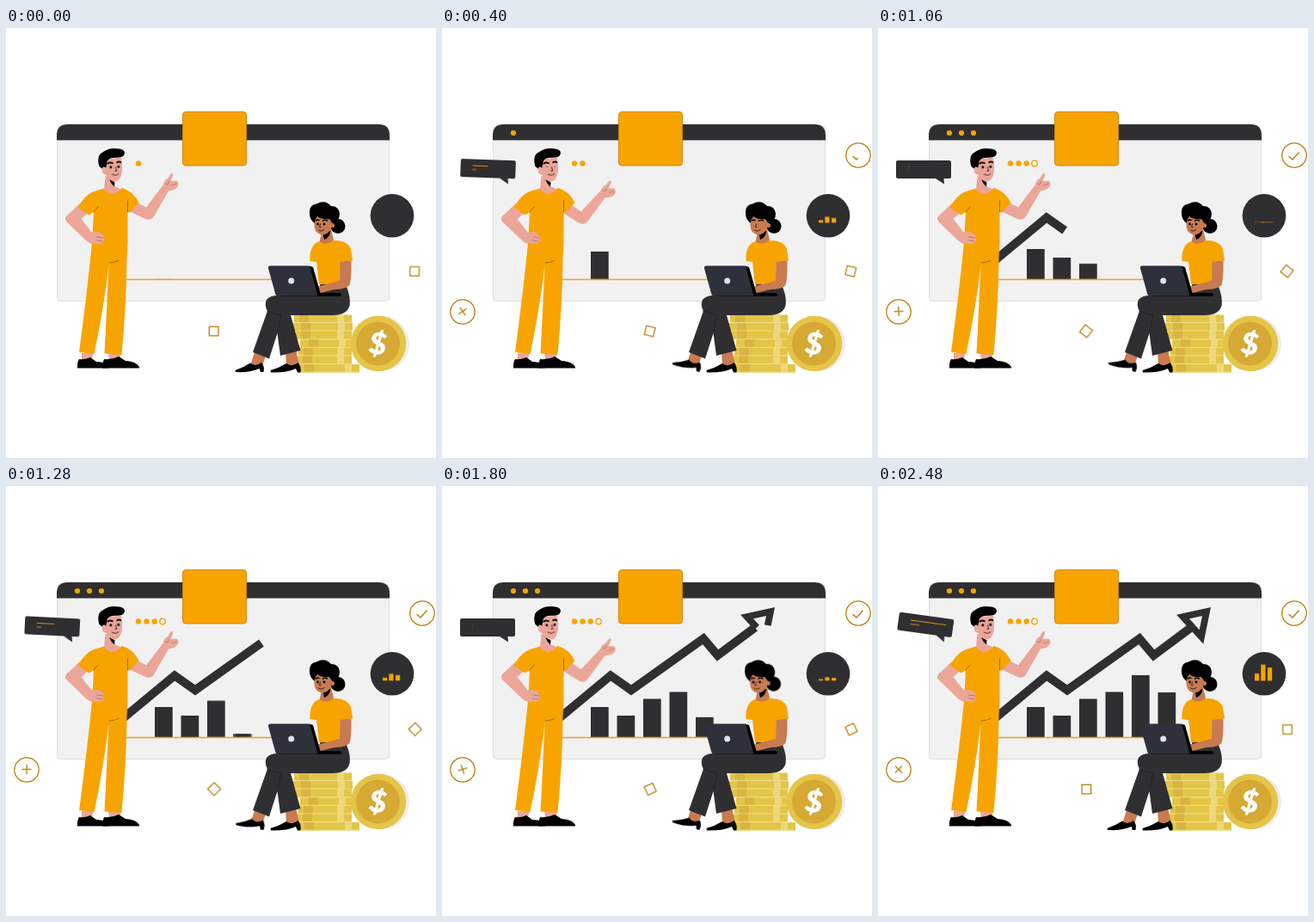
Recreate the animation shown at these times as an HTML page. Size 500x500 px, loop 2.5 s.

```html
<!DOCTYPE html>
<html lang="en">
<head>
<meta charset="utf-8">
<title>Growth presentation</title>
<style>
html, body { margin: 0; width: 100%; height: 100%; overflow: hidden; background: #fff; }
svg { display: block; width: 100vw; height: 100vh; }

.ink { fill: #2f2f31; }
.gold { fill: #f7a400; }
.skin { fill: #eba699; }
.tan { fill: #c87a50; }
.thin { fill: none; stroke: #b97a04; stroke-width: 1.25; }
.crease { fill: none; stroke: #8a5a00; stroke-width: .8; stroke-linecap: round; }
.fold { fill: none; stroke: #b0705f; stroke-width: .8; stroke-linecap: round; }
.face { fill: none; stroke: #111; stroke-linecap: round; }

/* every part runs on the 2.5 s loop or a whole fraction of it */
.loop { animation: 2.5s linear infinite both; }
.half { animation: 1.25s linear infinite both; }
.third { animation: .83333s linear infinite both; }

.spin { animation-name: spin; }
@keyframes spin { to { transform: rotate(90deg); } }
.sway { animation: sway 1.25s cubic-bezier(.37, 0, .63, 1) infinite alternate both; }
@keyframes sway { to { transform: rotate(45deg); } }

.bar { transform-origin: 0 292px; }
.b1 { animation-name: b1; } .b2 { animation-name: b2; } .b3 { animation-name: b3; }
.b4 { animation-name: b4; } .b5 { animation-name: b5; } .b6 { animation-name: b6; }
@keyframes b1 { 0% { transform: scaleY(0); } 17.5%, to { transform: none; } }
@keyframes b2 { 0%, 16.7% { transform: scaleY(0); } 33.3%, to { transform: none; } }
@keyframes b3 { 0%, 36% { transform: scaleY(0); } 52%, to { transform: none; } }
@keyframes b4 { 0%, 50% { transform: scaleY(0); } 66.7%, to { transform: none; } }
@keyframes b5 { 0%, 66.7% { transform: scaleY(0); } 83.3%, to { transform: none; } }
@keyframes b6 { 0%, 83.3% { transform: scaleY(0); } 98.5%, to { transform: none; } }

.trend { stroke-dasharray: 294 400; animation-name: trend; }
@keyframes trend {
  0%, 22% { stroke-dashoffset: 294.5; }
  29.6% { stroke-dashoffset: 262; }
  42.4% { stroke-dashoffset: 186; }
  59.2%, to { stroke-dashoffset: 0; }
}
.tip { stroke-dasharray: 100 200; animation-name: tip; }
@keyframes tip {
  0%, 60% { stroke-dashoffset: 100.5; }
  72% { stroke-dashoffset: 32; }
  80%, to { stroke-dashoffset: 0; }
}

.p1 { animation-name: p1; } .p2 { animation-name: p2; } .p3 { animation-name: p3; }
.pop { transform-box: fill-box; transform-origin: center; }
@keyframes p1 { 0%, 8% { transform: scale(0); } 13%, to { transform: none; } }
@keyframes p2 { 0%, 23% { transform: scale(0); } 27%, to { transform: none; } }
@keyframes p3 { 0%, 36% { transform: scale(0); } 40%, to { transform: none; } }

.show { animation-name: show; }
@keyframes show { 0%, 8.9% { visibility: hidden; } 9%, to { visibility: visible; } }

.check { stroke-dasharray: 18 40; animation-name: check; }
@keyframes check { 0%, 10% { stroke-dashoffset: 18.5; } 22%, to { stroke-dashoffset: 0; } }

.tilt { transform-origin: 77px 180px; animation-name: tilt; }
@keyframes tilt {
  0% { transform: rotate(8deg); }
  15%, 28% { transform: none; }
  48% { transform: rotate(2deg); }
  78% { transform: rotate(6.5deg); }
  to { transform: rotate(8deg); }
}
.type { transform-origin: 35px 0; animation-name: type; }
@keyframes type {
  0% { transform: none; }
  15%, 27% { transform: scaleX(.03); }
  48% { transform: scaleX(.42); }
  78%, 89% { transform: scaleX(.77); }
  98%, to { transform: none; }
}
.mini { transform-origin: 0 226.5px; animation-name: mini; }
@keyframes mini {
  0% { transform: none; }
  16% { transform: scaleY(.22); }
  27% { transform: scaleY(.05); }
  48% { transform: scaleY(.36); }
  78%, 89% { transform: scaleY(.71); }
  98%, to { transform: none; }
}

.wave { transform-origin: 146px 206px; animation-name: wave; animation-timing-function: ease-in-out; }
@keyframes wave {
  0%, 18% { transform: none; }
  33%, 40% { transform: translate(-1px, 3px) rotate(6.5deg); }
  60% { transform: translate(-.5px, 1.5px) rotate(3.5deg); }
  82%, to { transform: none; }
}
.nod { transform-origin: 372px 246px; animation-name: nod; animation-timing-function: ease-in-out; }
@keyframes nod {
  0%, 34% { transform: none; }
  58% { transform: rotate(-4deg); }
  82%, to { transform: none; }
}
.tap { transform-origin: 299px 399px; animation-name: tap; }
@keyframes tap {
  0%, 6% { transform: none; }
  16%, 48% { transform: rotate(16deg); }
  64%, to { transform: none; }
}
.blink { animation-name: blink; transform-box: fill-box; transform-origin: center; }
@keyframes blink {
  0%, 26% { transform: none; }
  30%, 36% { transform: scaleY(.15); }
  40%, to { transform: none; }
}
</style>
</head>
<body>
<svg viewBox="0 0 500 500">
  <!-- board -->
  <rect x="59.5" y="114" width="386" height="203.5" rx="4" fill="#f1f1f2" stroke="#e6d3ce" stroke-width=".8"/>
  <path class="ink" d="M59 130.5V125Q59 112 72 112H433Q446 112 446 125V130.5Z"/>
  <g class="gold">
    <circle class="loop pop p1" cx="83" cy="122" r="3.1"/>
    <circle class="loop pop p2" cx="97" cy="122" r="3.1"/>
    <circle class="loop pop p3" cx="111" cy="122" r="3.1"/>
    <circle cx="154" cy="157.5" r="3.2"/>
    <circle class="loop pop p1" cx="163.5" cy="157.5" r="3.2"/>
    <circle class="loop pop p2" cx="172.7" cy="157.5" r="3.2"/>
  </g>
  <circle class="loop pop p3" cx="182" cy="157.5" r="3.2" fill="#fff" stroke="#f7a400" stroke-width="1.4"/>
  <rect x="205.5" y="97.5" width="74" height="62.5" rx="3.5" fill="#f7a400" stroke="#c98400" stroke-width=".9"/>

  <!-- chart -->
  <g class="ink">
    <rect class="loop bar b1" x="173" y="257" width="20.700" height="35"/>
    <rect class="loop bar b2" x="203.500" y="267" width="20.700" height="25"/>
    <rect class="loop bar b3" x="234" y="247.500" width="20.700" height="44.500"/>
    <rect class="loop bar b4" x="264.500" y="239.500" width="20.700" height="52.500"/>
    <rect class="loop bar b5" x="295" y="220" width="20.700" height="72"/>
    <rect class="loop bar b6" x="325.500" y="240" width="20.700" height="52"/>
  </g>
  <path d="M139 292.500H322" stroke="#eba41c" stroke-width="1.4"/>
  <g fill="none" stroke="#2f2f31">
    <path class="loop trend" pathLength="294" stroke-width="10" d="M132 273.500L196 220.500L220 237.300L304 177.500L320.500 197L364 164.500"/>
    <path class="loop tip" pathLength="100" stroke-width="7.8" stroke-miterlimit="8" d="M366 164.500L354.500 152L382 146L376 175.500Z"/>
  </g>

  <!-- floating icons -->
  <g transform="translate(242 353)"><rect class="thin loop spin" x="-5.7" y="-5.7" width="10.6" height="10.6"/></g>
  <g transform="translate(475.5 283.5)"><rect class="thin loop spin" x="-5.7" y="-5.9" width="10.6" height="10.6"/></g>
  <g class="loop pop p1">
    <circle class="thin" cx="24" cy="330" r="14.2"/>
    <g transform="translate(24 329.5)"><path class="thin sway" d="M-4-4L4 4M-4 4L4-4"/></g>
  </g>
  <circle class="thin loop pop p1" cx="484" cy="148" r="14.2"/>
  <path class="thin loop check" pathLength="18" d="M477.500 149L482 153L489.500 144.500"/>

  <circle class="ink" cx="449" cy="218.300" r="25.300"/>
  <g class="loop show"><g class="gold third mini">
    <rect x="438" y="218" width="5.2" height="8.5"/>
    <rect x="445.3" y="207.5" width="5.2" height="19"/>
    <rect x="453" y="211" width="5.2" height="15.5"/>
  </g></g>

  <g class="loop show"><g class="third tilt">
    <path class="ink" d="M23 154H83Q85 154 85 156V173Q85 175 83 175H76.5L77 181.5L67 175H23Q21 175 21 173V156Q21 154 23 154Z"/>
    <path class="third type" d="M35 161.5H77M35 166H46" stroke="#d08f12" stroke-width="1.2"/>
  </g></g>

  <!-- presenter -->
  <g>
    <g class="half wave">
      <path class="skin" d="M145 199L163 208.5L183 182Q184 177 188 175L191.500 169.500Q194.500 168 194 172L191.500 178L198.500 177.500Q202 181 199.500 184.500Q196 189 189 189.500L172 219Q168 225 161 221.500L141 212Z"/>
      <path class="fold" d="M185 181Q190 184 189 178M193 183L198 181"/>
    </g>
    <path class="skin" d="M86 204L70 219Q68 222 70 225L92 246Q97 252 104 251Q113 252 114.500 246Q115 240 109 236.500Q103 235 100 238L87.500 222L100 211Z"/>
    <path class="skin" d="M88 378H102L99 387H88ZM119 378H133V386H120Z"/>
    <path d="M85 385Q91 386 98 383L105 388Q117 388 119.500 394V395.500H83Q82.500 389 85 385Z"/>
    <path d="M114 385Q123 386 131 382L139 387Q152 388 155 394V395.500H112Q112 389 114 385Z"/>
    <path class="gold" d="M114 186.500Q124 195 135 186Q147 189 154.500 203L143.500 215L141.500 213V250L140.500 268Q140 320 134.500 380L114.500 378.500Q117 330 119.500 276Q113 330 102.500 379L85 377Q94 310 100 250L102 214L96.500 217.500L83.500 208.500Q92 194 102 190Z"/>
    <path class="crease" d="M102 214L107 208M141.500 214V201M120 273Q126 273 131 270.500"/>
    <path class="skin" d="M100 239Q107 234 113 241Q116 247 112 250Q104 253 99 249Z"/>
    <path class="fold" d="M106 243L113 244M105 247L112 248"/>
    <path class="skin" d="M115.500 172L114 187Q124 199 133 187L126 184V174Z"/>
    <path d="M120 176L126.500 179.500L126 184.500Q122 181 120 176Z"/>
    <g transform="translate(.8 .7)">
      <path class="skin" d="M113 152L133 150Q136 165 132.500 172Q130 178.500 125 177.500Q118 176 115.500 170Q110 169 111 163Q113 160 115 162Z"/>
      <path d="M107.500 160Q104 147 112 143.500Q119 138 129 139.500Q138 140 137 145.500Q136 150.500 126 150Q119 150 117 154L115.500 162Q112 159 111 163Z"/>
      <path class="face" stroke-width="2" d="M117.500 157Q120 155 123 156.500M128.500 155.500Q131 154 132.500 155.500"/>
      <g class="half blink"><circle cx="121" cy="161" r="1.5"/><circle cx="130" cy="160.500" r="1.5"/></g>
      <path class="face" stroke-width=".8" d="M126.500 161L128 165.500H126M122.500 169.500Q127 172 130 169"/>
    </g>
  </g>

  <!-- coins -->
  <g id="coins"></g>
  <circle cx="437" cy="367" r="32" fill="#eeecea"/>
  <circle cx="433" cy="367" r="32.300" fill="#e5c448"/>
  <circle cx="432.500" cy="367" r="25.500" fill="#d5a934"/>
  <text x="432.500" y="379.500" transform="rotate(11 432.500 367)" text-anchor="middle" fill="#fff" font-family="Lato, Inter, sans-serif" font-weight="900" font-size="35">$</text>

  <!-- seated woman -->
  <g>
    <path class="tan" d="M289 377L302 381L298 393L284 393ZM325 376L337 374L341 392L326 393Z"/>
    <path class="third tap" d="M266.500 398Q276 395 284 389.500Q290 394.500 297 389Q301 393 299.500 400H296L294.500 396Q284 401 267 400Z"/>
    <path d="M307.500 398Q318 395 326 390Q333 395 339.500 389Q343.500 393 342.500 400.500H339L337 396Q327 401 308 400.500Z"/>
    <path class="ink" d="M366 297L396 301Q401 313 399.500 323Q396 334 380 334H331L342.500 375L319 381L315.500 355L306 384.500L287 377L304 329Q300 322 303 316Q307 311 316 311H360Z"/>
    <path d="M303 329L320 334L315.500 355" fill="none" stroke="#1f1f21" stroke-width=".7"/>
    <path class="gold" d="M363 248.500L383 247Q397 247 401 257L403 270.500L389 271.500L388 298H364L361 272L353.500 271Q352.500 253 363 248.500Z"/>
    <path class="tan" d="M364.500 248.500L368 234H378L381 246.500Q373 254 364.500 248.500Z"/>
    <path d="M368 237L377.500 236Q376 244 370 246Z"/>
    <g class="half nod">
      <circle cx="386" cy="230.500" r="8.500"/>
      <path class="tan" d="M359 217L378 215Q381 227 378 233Q374 241 367 240.500Q359 239 358.500 230Z"/>
      <path d="M353 216Q352 206 361 204.500Q371 199 378 207Q387 207 388 216Q388 224 380 228L376 222Q367 223 362 219Q359 223 358.500 227Q353 222 353 216Z"/>
      <circle class="tan" cx="379.500" cy="229.500" r="2.600"/>
      <path class="face" stroke-width="1.600" d="M360.500 224Q362 222.500 364 223.500M368.500 224Q371 222.500 373.500 224"/>
      <g class="half blink"><circle cx="362.500" cy="228" r="1.400"/><circle cx="370" cy="228" r="1.400"/></g>
      <path class="face" stroke-width=".8" d="M365.500 228L364.500 231.500H366M363.500 235Q367 237.500 370 234.500"/>
    </g>
    <path class="tan" d="M388.500 271.500L401.500 270.500Q402 290 399.500 299Q395 304 382 304L364 308.500L357 306.500Q358 301 365 300L388 294Z"/>
    <path d="M352 276.500L357 278L365.500 308H388Q392 310 389 311.800H314L340 309.500Z"/>
    <path d="M307.500 276.500H351Q353 276.500 353.700 278.500L362.500 311.500H316Q314 311.500 313.300 309.500L305 279.500Q304.500 276.500 307.500 276.500Z" fill="#2e303c"/>
    <circle cx="331.700" cy="294" r="3.500" fill="#dce5ee"/>
  </g>
</svg>
<script>
// stacked coins, top to bottom: left and right edge of each
const rows = [[335, 402], [333, 403], [337, 402], [342, 404], [340, 402], [335, 402], [341, 411]];
const rect = (x, y, w, h, fill) => `<rect x="${x}" y="${y}" width="${w}" height="${h}" fill="${fill}"/>`;
document.getElementById('coins').innerHTML = rows.map(([left, right], i) => {
  const y = 333.5 + i * 9.6, w = right - left;
  return rect(left, y, w, 9.6, '#e3c547') +
    rect(left + 6 + i % 2 * 4, y, 11, 9.6, '#d9b440') +
    rect(right - 17, y, 8, 9.6, '#ecd87a') +
    rect(left, y + 8.6, w, 1, '#f0e09a');
}).join('');
</script>
</body>
</html>
```
